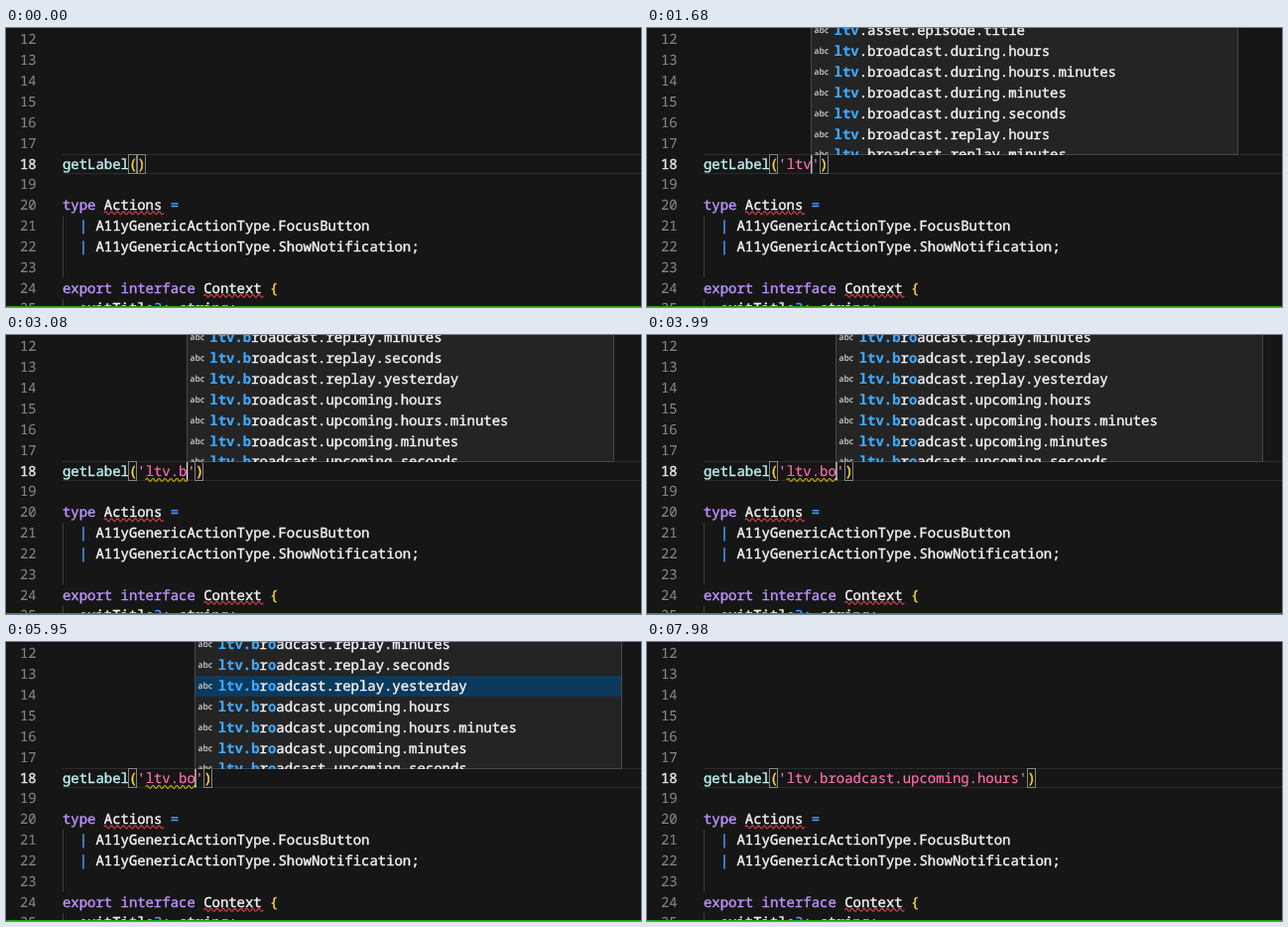
Write an HTML page that moves like this. It is 640 px wide and 281 px high and loops after 8000 ms.

```html
<!DOCTYPE html>
<html lang="en">
<head>
<meta charset="utf-8">
<title>Label completion</title>
<style>
  html, body { margin: 0; width: 100%; height: 100%; overflow: hidden; background: #161616; }
  svg { display: block; width: 100%; height: 100%; }
  text { font: 500 13.95px "Noto Sans Mono", "DejaVu Sans Mono", monospace; color: #f6f7fa;
         white-space: pre; text-rendering: geometricPrecision; }
  tspan, .icon { fill: currentColor; stroke: currentColor; stroke-width: .4px; }
  .num { color: #858585; stroke-width: .1px; }
  .now { color: #e6e6e6; }
  .key { color: #be95ff; }
  .op { color: #4a9eff; }
  .fn { color: #bff5f2; }
  .par { color: #ffd83d; }
  .str { color: #ff6fae; stroke-width: .2px; }
  .hit { color: #3fa9ff; font-weight: 700; stroke-width: .2px; }
  .icon { font: 600 8.5px "Open Sans", sans-serif; color: #c8c8c8; stroke-width: .1px; }
  .wave { fill: none; stroke: #d8404f; stroke-width: 1.2; }
  .warn { stroke: #d9b400; }
  .guide { fill: #3c3c3c; }
  .edge { fill: #2b2b2b; }
  .match { fill: none; stroke: #858585; }
  .panel { fill: #242425; stroke: #484848; }
  .pick { fill: #0c3a5c; }
</style>
</head>
<body>
<svg viewBox="0 0 640 281">
  <defs><clipPath id="above"><rect width="640" height="128"/></clipPath></defs>
  <g id="page"></g>
  <g id="live"></g>
  <rect y="280" width="640" height="1" fill="#1fa30f"/>
</svg>
<script>
const LOOP = 8000, STEP = 70, CHAR = 8.37, LEFT = 57, PITCH = 20.84;
const colX = col => LEFT + col * CHAR;
const lineY = n => 137 + (n - 18) * PITCH;

const rect = (cls, x, y, w, h) =>
  `<rect class="${cls}" x="${x}" y="${y}" width="${w}" height="${h}"/>`;
const span = ([cls, s]) => `<tspan class="${cls}">${s}</tspan>`;
const text = (x, mid, parts) => `<text x="${x}" y="${mid + 4.5}">${parts.map(span).join("")}</text>`;
const wave = (cls, col, count, y) =>
  `<path class="wave ${cls}" d="M${colX(col)} ${y}q1.5 -3 3 0${"t3 0".repeat(Math.round(count * CHAR / 3) - 1)}"/>`;

const code = {
  20: [["key", "type "], ["", "Actions "], ["op", "="]],
  21: [["op", "  | "], ["", "A11yGenericActionType.FocusButton"]],
  22: [["op", "  | "], ["", "A11yGenericActionType.ShowNotification;"]],
  24: [["key", "export interface "], ["", "Context "], ["par", "{"]],
  25: [["", "  exitTitle"], ["op", "?"], ["", ": string;"]]
};

function drawPage() {
  let out = rect("edge", LEFT, 127, 583, 1) + rect("edge", LEFT, 146, 583, 1)
    + rect("guide", LEFT, 189, 1, 62.5) + rect("guide", LEFT, 272.5, 1, 9);
  for (let n = 12; n <= 25; n++) {
    out += text(14, lineY(n), [[n === 18 ? "now" : "num", n]]);
    if (code[n]) out += text(LEFT, lineY(n), code[n]);
  }
  return out + wave("", 5, 7, 186.3) + wave("", 17, 7, 269.8);
}

const broad = s => "ltv.broadcast." + s;
const wideList = ["ltv.asset.episode.title",
  ...["during.hours", "during.hours.minutes", "during.minutes", "during.seconds",
      "replay.hours", "replay.minutes"].map(broad)];
const narrowList = ["replay.minutes", "replay.seconds", "replay.yesterday", "upcoming.hours",
  "upcoming.hours.minutes", "upcoming.minutes", "upcoming.seconds"].map(broad);

const edits = [[-500, null], [420, ""], [770, "l"], [980, "lt"], [1260, "ltv"],
  [1960, "ltv."], [2660, "ltv.b"], [3640, "ltv.bo"], [7350, broad("upcoming.hours")]];
const picks = [[0, -1], [5320, 0], [5530, 1], [5740, 2], [6230, 3]];
const latest = (list, t) => list.filter(([at]) => at <= t).pop();

// Splits a suggestion into matched and plain runs.
function matched(item, typed) {
  let used = 0;
  return [...item].map(ch => ch === typed[used] ? (used++, ["hit", ch]) : ["", ch])
    .reduce((runs, [cls, ch]) => {
      const last = runs[runs.length - 1];
      if (last && last[0] === cls) last[1] += ch; else runs.push([cls, ch]);
      return runs;
    }, []);
}

function drawPopup(caret, typed, pick) {
  const list = typed.length > 4 ? narrowList : wideList;
  const x = Math.floor(caret) + .5;
  let out = rect("panel", x, -5, 430, 132.5);
  list.forEach((item, i) => {
    const mid = 2.8 + i * PITCH;
    if (i === pick) out += rect("pick", x + .5, mid - 10.4, 429, PITCH);
    out += `<text class="icon" x="${x + 3}" y="${mid + 2.5}">abc</text>`
      + text(caret + 22.8, mid, matched(item, typed));
  });
  return `<g clip-path="url(#above)">${out}</g>`;
}

function drawLive(t) {
  const [at, typed] = latest(edits, t);
  const quoted = typed === null ? "" : `'${typed}'`;
  const caret = colX(typed === null ? 9 : 10 + typed.length);
  const box = col => rect("match", Math.floor(colX(col)) + .5, 127.5, 8, 19);
  let out = text(LEFT, 137, [["fn", "getLabel"], ["par", "("], ["str", quoted], ["par", ")"]])
    + box(8) + box(9 + quoted.length);
  if (t >= 2100 && t < 7350) out += wave("warn", 10, typed.length, 146);
  if (t >= 560 && t < 7350) out += drawPopup(caret, typed, latest(picks, t)[1]);
  if (Math.floor((t - at) / 500) % 2 === 0 && typed !== null)
    out += `<rect x="${caret - .6}" y="128" width="1.2" height="18.5" fill="#eee"/>`;
  return out;
}

const live = document.getElementById("live");
document.getElementById("page").innerHTML = drawPage();
let shown = -1;
function tick() {
  const t = Math.floor(performance.now() % LOOP / STEP) * STEP;
  if (t !== shown) live.innerHTML = drawLive(shown = t);
  requestAnimationFrame(tick);
}
tick();
</script>
</body>
</html>
```
